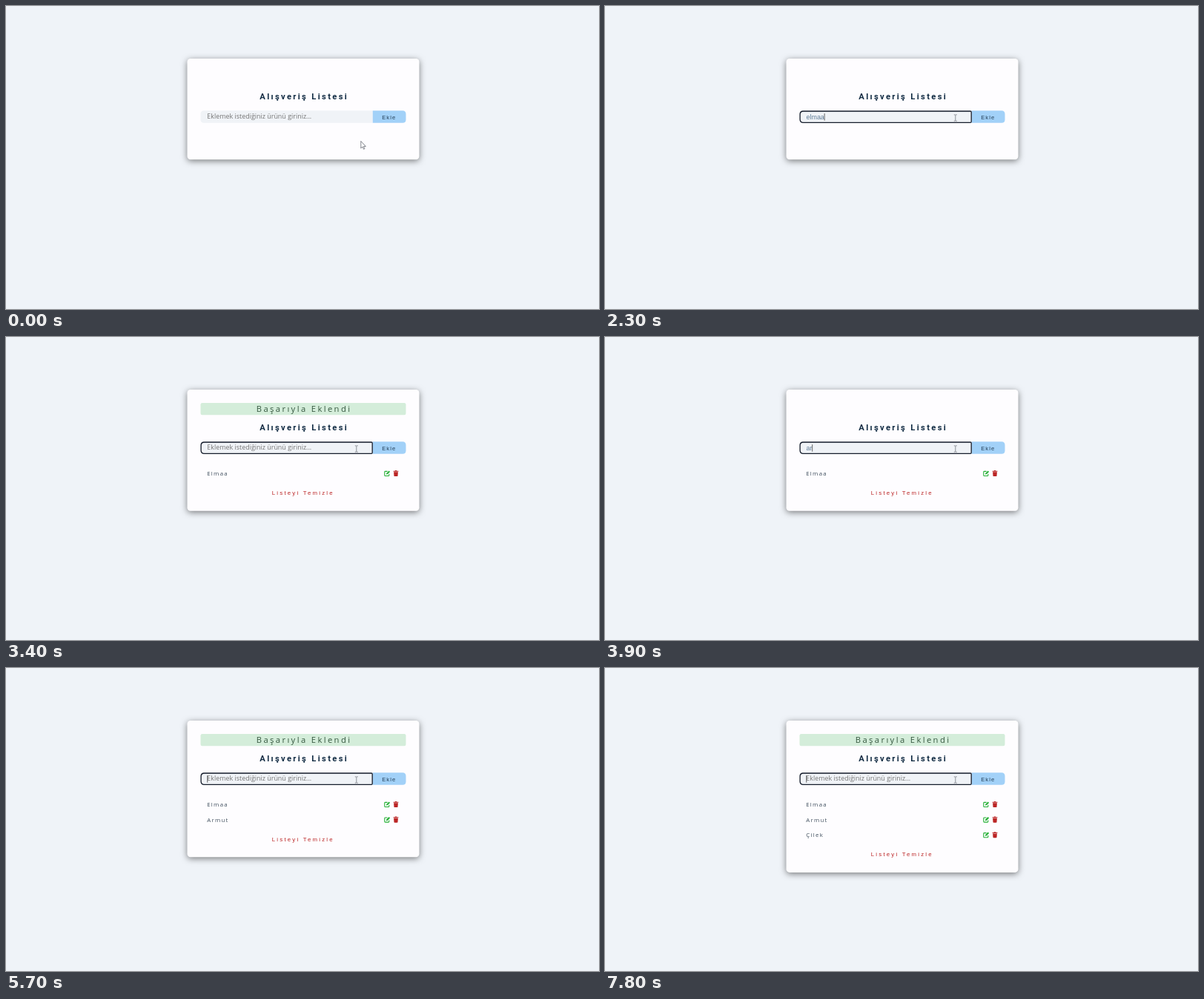
An HTML page for the animation above (8000 ms loop, 800 px wide and 409 px high).

```html
<!DOCTYPE html>
<html lang="tr">
<head>
<meta charset="utf-8">
<style>
  html, body { margin: 0; height: 100%; overflow: hidden; background: #eff3f8; }
  svg { display: block; width: 800px; height: 409px; }
  text { white-space: pre; }
  #card { fill: #fefdff; filter: drop-shadow(0 2.8px 4.2px rgba(0, 0, 0, .5)); }
  .open { font-family: "Open Sans", sans-serif; }
  .arial { font-family: "Liberation Sans", Arial, sans-serif; }
  .title { font: bold 11.2px Roboto, sans-serif; letter-spacing: 2.35px; fill: #102a42; }
  .notice { font-size: 11.2px; letter-spacing: 2.4px; fill: #35573f; }
  .hint { font-size: 8.94px; fill: #757575; }
  .value { font-size: 8.94px; fill: #617d98; }
  .add { font-size: 7.6px; letter-spacing: 1.1px; fill: #243f57; }
  .item { font-size: 7.82px; letter-spacing: 1.3px; fill: #41505f; }
  .clear { font-size: 7.82px; letter-spacing: 2.235px; fill: #bb2525; }
</style>
</head>
<body>
<svg viewBox="0 0 800 409">
  <defs>
    <g id="icons">
      <path d="M514.6 181.4H511.6Q510.8 181.4 510.8 182.2V186.7Q510.8 187.5 511.6 187.5H516Q516.8 187.5 516.8 186.7V184.8" fill="none" stroke="#25b035" stroke-width="1.1"/>
      <path d="M512.9 185.6L513.2 183.9L516.6 180.4L518.1 181.9L514.6 185.3Z" fill="#25b035"/>
      <path d="M522.6 180.7H524.6L525 180H527L527.4 180.7H529.4V181.7H522.6ZM523.1 182.2H528.9L528.5 187.4Q528.4 188.1 527.7 188.1H524.3Q523.6 188.1 523.5 187.4Z" fill="#bb2525"/>
    </g>
  </defs>
  <rect id="card" x="244.5" y="71" width="313" rx="4.5"/>
  <g id="notice">
    <rect x="262.5" y="89" width="277" height="16.3" rx="2.2" fill="#d4edda"/>
    <text class="open notice" x="337.8" y="101.2">Başarıyla Eklendi</text>
  </g>
  <text class="title" x="342.3" y="126.3">Alışveriş Listesi</text>
  <path d="M494.5 141.3H535Q539.5 141.3 539.5 145.8V153.3Q539.5 157.8 535 157.8H494.5Z" fill="#a2d1f8"/>
  <text class="arial add" x="507.2" y="152.6">Ekle</text>
  <path d="M494.5 141.3H267Q262.5 141.3 262.5 145.8V153.3Q262.5 157.8 267 157.8H494.5Z" fill="#f0f3f7"/>
  <path id="outline" d="M493 142H267.5Q263.1 142 263.1 146.4V153Q263.1 157.3 267.5 157.3H493Q494.2 157.3 494.2 156.1V143.2Q494.2 142 493 142Z" fill="none" stroke="#151c2b" stroke-width="1.3"/>
  <text id="hint" class="open hint" x="271.3" y="152.4">Eklemek istediğiniz ürünü giriniz...</text>
  <text id="value" class="arial value" x="271.5" y="152.6"></text>
  <rect id="caret" y="145" width=".8" height="9.6" fill="#444"/>
  <g id="list">
    <g class="row"><text class="open item" x="271.2" y="187">Elmaa</text><use href="#icons"/></g>
    <g class="row" transform="translate(0 20.6)"><text class="open item" x="271.2" y="187">Armut</text><use href="#icons"/></g>
    <g class="row" transform="translate(0 41.2)"><text class="open item" x="271.2" y="187">Çilek</text><use href="#icons"/></g>
    <text id="clear" class="arial clear" x="358.7">Listeyi Temizle</text>
  </g>
  <path id="arrow" d="M0 0V9.6L2.2 7.6L3.7 10.9L5.1 10.3L3.6 7.1H6.5Z" fill="#fff" stroke="#666a74" stroke-width=".8"/>
  <path id="beam" d="M-2 -4.2H-.6L0 -3.7L.6 -4.2H2M0 -3.7V3.7M-2 4.2H-.6L0 3.7L.6 4.2H2" fill="none" stroke="#73777f" stroke-width=".8"/>
</svg>
<script>
  const LOOP = 8000, FOCUS = 1000;
  const typing = [
    [0, ''], [1600, 'e'], [2100, 'elm'], [2300, 'elmaa'], [2600, ''],
    [3800, 'a'], [3900, 'ar'], [4000, 'arm'], [4200, 'armu'], [4300, 'armut'], [4600, ''],
    [5900, 'ç'], [6100, 'çi'], [6300, 'çil'], [6400, 'çile'], [6500, 'çilek'], [6900, '']
  ];
  const submits = [2600, 4600, 6900];
  const caretOff = [[0, FOCUS], [1300, 1600], [3400, 3800], [5000, 5400], [6700, 6900], [7400, 7800]];

  const el = id => document.getElementById(id);
  const show = (node, on) => node.setAttribute('visibility', on ? 'visible' : 'hidden');
  const rows = document.querySelectorAll('.row');

  function render(ms) {
    const t = Math.floor(ms / 100) * 100;
    const text = typing.findLast(([start]) => start <= t)[1];
    const count = submits.filter(s => s <= t).length;

    el('card').setAttribute('height', count ? 163.7 + 20.6 * (count - 1) : 136.3);
    show(el('notice'), count && !text);
    rows.forEach((row, i) => show(row, i < count));
    show(el('clear'), count);
    el('clear').setAttribute('y', 213 + 20.6 * (count - 1));

    show(el('outline'), t >= FOCUS);
    show(el('hint'), !text);
    el('value').textContent = text;
    el('caret').setAttribute('x', 271.4 + (text ? el('value').getComputedTextLength() : 0));
    show(el('caret'), !caretOff.some(([from, to]) => t >= from && t < to));

    const p = Math.min(1, Math.max(0, (t - 600) / 250));
    const x = 478.8 - 6 * p, y = 182.4 - 31.4 * p;
    for (const id of ['arrow', 'beam']) {
      el(id).setAttribute('transform', `translate(${x} ${y})`);
      show(el(id), (id === 'beam') === (y < 158));
    }
  }

  const begin = performance.now();
  function tick() {
    render((performance.now() - begin) % LOOP);
    requestAnimationFrame(tick);
  }
  tick();
</script>
</body>
</html>
```
